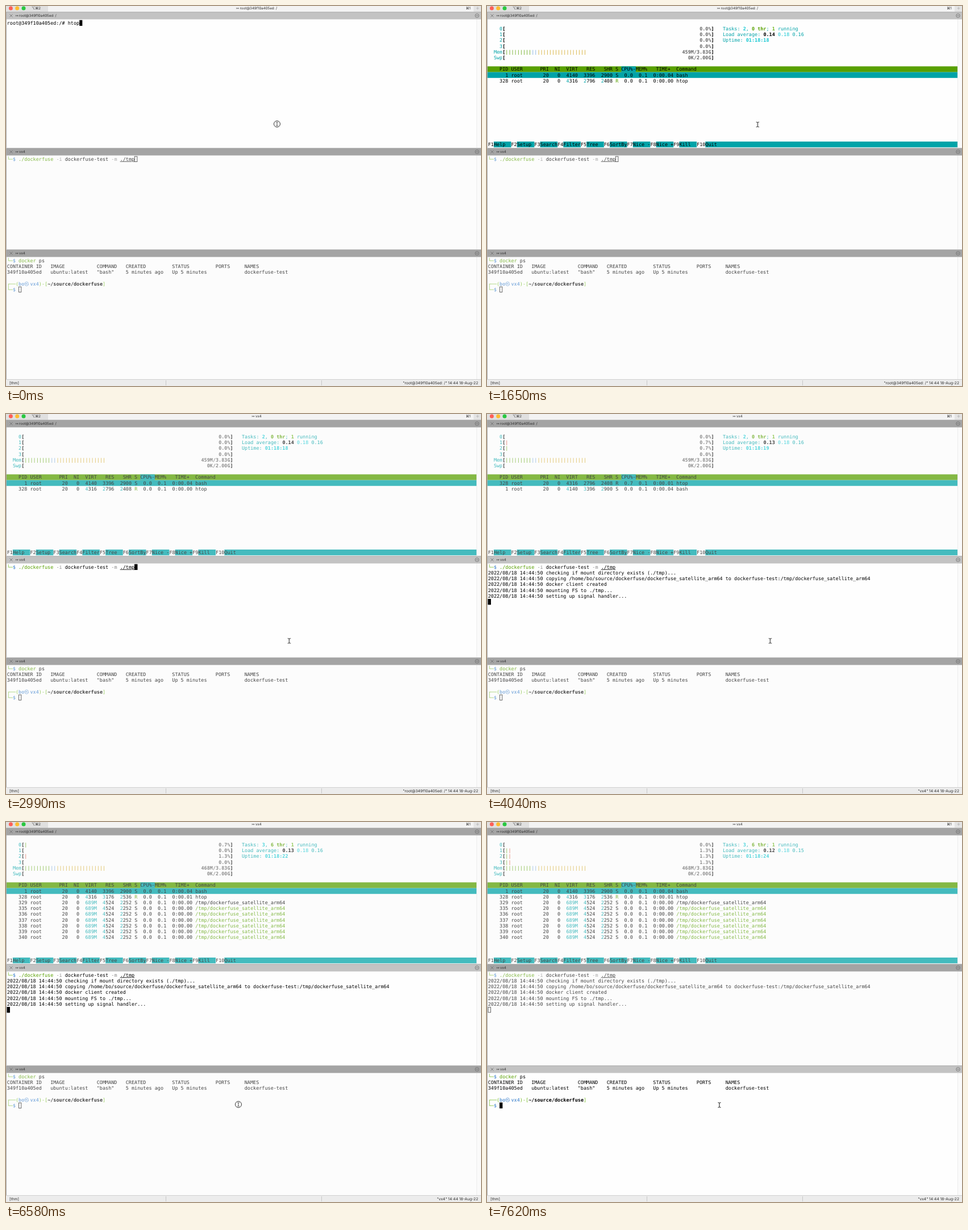
An HTML page that plays this animation: 836x670 px, repeating every 8 s.

```html
<!DOCTYPE html>
<html lang="en">
<head>
<meta charset="utf-8">
<title>Terminal session</title>
<style>
html, body { margin: 0; width: 100%; height: 100%; overflow: hidden; background: #fefefe; }
svg { display: block; width: 836px; height: 670px; }
text { white-space: pre; text-rendering: geometricPrecision; }
.term text { font: 8.475px "DejaVu Sans Mono", monospace; fill: #000; }
.ui { font: 6.15px Inter, "DejaVu Sans", sans-serif; fill: #2c2c2c; }
.term .t { fill: #00a3a8; }
.term .c { fill: #14c8d2; }
.term .g { fill: #58a000; }
.term .p { fill: #6fb81f; }
.term .b { fill: #6a9fd8; }
.term .r { fill: #d8432c; }
.term .y { fill: #cfa012; }
.term .a { fill: #8a8a8a; }
.term .s { fill: #666; }
.term .B { font-weight: bold; }
.term .u { text-decoration: underline; }
.term .k { font-family: "Noto Sans CJK KR", "Noto Sans CJK JP", "Noto Sans CJK", sans-serif; font-size: 8px; }
.teal { fill: #00a3a8; }
.green { fill: #58a000; }
.icon { fill: none; stroke: #6e6e6e; stroke-width: .8; }
</style>
</head>
<body>
<svg id="stage" viewBox="0 0 836 670"></svg>
<script>
const LOOP = 8000, CW = 5.102, CH = 10.2, LEFT = 1.7;
const HOST = 'vx4', SHELL = 'root@349f10a405ed: /';
let css = '', count = 0;

// Hard changes: a list of [time, declaration]
function steps(list) {
  const name = 'k' + count++;
  css += `@keyframes ${name}{${list.map(([t, d]) => `${t / LOOP * 100}%{${d}}`).join('')}}`;
  return `style="animation:${name} ${LOOP}ms step-end infinite"`;
}

function windowed(from, to, on, off) {
  const list = [[0, from > 0 ? off : on]];
  if (from > 0) list.push([from, on]);
  if (to < LOOP) list.push([to, off]);
  return steps(list);
}

const during = (from, to, body) =>
  `<g ${windowed(from, to, 'visibility:visible', 'visibility:hidden')}>${body}</g>`;

const rect = (x, y, w, h, attrs) =>
  `<rect x="${x}" y="${y}" width="${w}" height="${h}" ${attrs}/>`;

const label = (x, y, text, attrs = '') =>
  `<text class="ui" x="${x}" y="${y}" ${attrs}>${text}</text>`;

// Terminal grid: runs are "classes:text", joined by ¦
function grid(top) {
  const rowY = r => top + r * CH, colX = c => LEFT + c * CW;
  const line = (r, spec, col = 0) => spec.split('¦').map(run => {
    const i = run.indexOf(':'), text = run.slice(i + 1);
    const out = `<text class="${run.slice(0, i)}" x="${colX(col).toFixed(2)}" y="${(rowY(r) + 8.04).toFixed(2)}">${text}</text>`;
    col += text.length;
    return out;
  }).join('');
  const cells = (r, col, n, cls) =>
    rect(colX(col).toFixed(2), rowY(r).toFixed(2), (n * CW).toFixed(2), CH, `class="${cls}"`);
  const band = (r, cls, col = 0) => {
    const x = col ? colX(col) : 1;
    return rect(x, rowY(r), 828 - x, CH, `class="${cls}"`);
  };
  const cursor = (r, col, from, to) => {
    const x = colX(col), y = rowY(r);
    return rect(x + .4, y + .4, CW - .8, CH - .8, 'fill="none" stroke="#000" stroke-width=".8"') +
      during(from, to, rect(x, y, CW, CH, 'fill="#000"'));
  };
  return { line, cells, band, cursor };
}

// Panes
function pane(y, h, title, from, to, body) {
  const mid = y + 6;
  return rect(0, y + 12, 836, h - 12, windowed(from, to, 'fill:#fefefe', 'fill:#fcfcfc')) +
    rect(828, y + 12, 8, h - 12, 'fill="#fafafa"') +
    rect(828, y + 12, .7, h - 12, 'fill="#e6e6e6"') +
    rect(0, y, 836, 12.5, windowed(from, to, 'fill:#c3c3c3', 'fill:#a4a4a4')) +
    rect(0, y - .6, 836, .8, 'fill="#999"') +
    rect(0, y, 1, h, 'fill="#aaa"') +
    `<path class="icon" d="M6.5 ${mid - 2.5}l5 5m0-5l-5 5"/>` +
    `<circle class="icon" cx="829" cy="${mid}" r="3.3"/><path class="icon" d="M827 ${mid}h4"/>` +
    label(16.5, mid + 2.2, '↣') + label(23, mid + 2.2, title) +
    `<g class="term" ${windowed(from, to, 'opacity:1', 'opacity:.73')}>${body}</g>`;
}

// Process monitor
const top1 = grid(24.8);
const bash = { pid: '1', mem: ['4140', '3396', '2900'], state: 'S', cpu: '0.0', time: '0:00.04', cmd: 'bash' };
const monitor = (res, shr, cpu, time) =>
  ({ pid: '328', mem: ['4316', res, shr], state: 'R', cpu, time, cmd: 'htop' });
const satellites = [329, 335, 336, 337, 338, 339, 340].map((pid, i) => ({
  pid: '' + pid, mem: ['689M', '4524', '2252'], state: 'S', cpu: '0.0', time: '0:00.00',
  cmd: '/tmp/dockerfuse_satellite_arm64', thread: i > 0
}));

function processRow(p, i) {
  const chosen = i === 0;
  const num = s => chosen ? ':' + s : s.endsWith('M') ? 't:' + s : `t:${s[0]}¦:${s.slice(1)}`;
  const runs = [
    `:${p.pid.padStart(7)} root       20   0  `,
    p.mem.map(num).join('¦:  ¦'),
    ': ', (p.state === 'R' && !chosen ? 'g:' : ':') + p.state,
    `:  ${p.cpu}  0.1  ${p.time} `,
    (p.thread ? 'g:' : ':') + p.cmd
  ];
  return (chosen ? top1.band(9, 'teal') : '') + top1.line(9 + i, runs.join('¦'));
}

function readings(s) {
  const cpu = s.cpu.map(([bars, pct], i) =>
    [...bars].map((c, n) => top1.line(1 + i, c + ':|', 6 + n)).join('') +
    top1.line(1 + i, `s B:${pct}%`, 73)).join('');
  return cpu + top1.line(5, `s B:${s.mem}/3.83G`, 67) +
    top1.line(1, `t:Tasks: ¦c B:${s.tasks}¦t:, ¦g B:${s.threads} thr¦t:; ¦p B:1¦t: running`, 81) +
    top1.line(2, `t:Load average: ¦B:${s.load[0]} ¦c:${s.load[1]} ¦t:${s.load[2]}`, 81) +
    top1.line(3, `t:Uptime: ¦c B:01:18:${s.sec}`, 81) +
    s.procs.map(processRow).join('');
}

const idle = ['', '0.0'];
const small = { mem: '459M', tasks: 2, threads: 0 };
const large = { mem: '468M', tasks: 3, threads: 6 };
const settled = [bash, monitor('3176', '2536', '0.0', '0:00.01'), ...satellites];
const updates = [
  { ...small, at: 1650, cpu: [idle, idle, idle, idle], load: ['0.14', '0.18', '0.16'], sec: 18,
    procs: [bash, monitor('2796', '2408', '0.0', '0:00.00')] },
  { ...small, at: 3140, cpu: [idle, ['r', '0.7'], ['g', '0.7'], idle], load: ['0.13', '0.18', '0.16'], sec: 19,
    procs: [monitor('2796', '2408', '0.7', '0:00.01'), bash] },
  { ...large, at: 4640, cpu: [['gr', '1.3'], ['r', '0.7'], idle, ['g', '0.7']], load: ['0.13', '0.18', '0.16'], sec: 21,
    procs: [bash, monitor('2796', '2408', '0.0', '0:00.01'), ...satellites] },
  { ...large, at: 6130, cpu: [['g', '0.7'], idle, ['r', '1.3'], idle], load: ['0.13', '0.18', '0.16'], sec: 22,
    procs: settled },
  { ...large, at: 7620, cpu: [idle, ['gr', '1.3'], ['gr', '1.3'], ['gr', '1.3']], load: ['0.12', '0.18', '0.15'], sec: 24,
    procs: settled }
];

const keys = ['Help', 'Setup', 'Search', 'Filter', 'Tree', 'SortBy', 'Nice -', 'Nice +', 'Kill', 'Quit'];
const keyBar = keys.map((k, i) => {
  const col = i * 8, key = 'F' + (i + 1), start = col + key.length;
  return (i < 9 ? top1.cells(21, start, 6, 'teal') : top1.band(21, 'teal', start)) +
    top1.line(21, `:${key}¦:${k}`, col);
}).join('');

const frame = ['0', '1', '2', '3', 'Mem', 'Swp'].map((name, i) =>
  top1.line(1 + i, `t:${name.padStart(5)}¦B:[`) + top1.line(1 + i, 'B:]', 77)).join('') +
  top1.line(5, `g:${'|'.repeat(9)}¦b:||¦y:${'|'.repeat(17)}`, 6) +
  top1.line(6, 's B:0K/2.00G', 69) +
  top1.band(8, 'green') + top1.cells(8, 46, 5, 'teal') +
  top1.line(8, ':    PID USER      PRI  NI  VIRT   RES   SHR S CPU%-MEM%   TIME+  Command') + keyBar;

const shellPane =
  during(0, 1500, top1.line(0, ':root@349f10a405ed:/# htop') + top1.cells(0, 25, 1, 'block')) +
  during(1650, LOOP, frame) +
  updates.map((s, i) => during(s.at, i + 1 < updates.length ? updates[i + 1].at : LOOP, readings(s))).join('');

// Mount command
const top2 = grid(264.8);
const log = [
  'checking if mount directory exists (./tmp)...',
  'copying /home/bo/source/dockerfuse/dockerfuse_satellite_arm64 to dockerfuse-test:/tmp/dockerfuse_satellite_arm64',
  'docker client created',
  'mounting FS to ./tmp...',
  'setting up signal handler...'
];
// The solid block is nested, so its own window must end with the outer one
const mountPane =
  top2.line(0, 'p:└─¦b B:$¦: ¦g:./dockerfuse¦a: -i¦: dockerfuse-test¦a: -m¦: ¦u:./tmp') +
  during(0, 3890, top2.cursor(0, 44, 2990, 3890)) +
  during(3890, 4040, top2.cursor(1, 0, 3890, 4040)) +
  during(4040, LOOP, log.map((m, i) => top2.line(1 + i, ':2022/08/18 14:44:50 ' + m)).join('') +
    top2.cursor(6, 0, 4040, 6730));

// Container list
const top3 = grid(443.7);
const listPane =
  top3.line(0, 'p:└─¦b B:$¦: ¦g:docker¦: ps') +
  top3.line(1, ':CONTAINER ID   IMAGE           COMMAND   CREATED         STATUS         PORTS     NAMES') +
  top3.line(2, ':349f10a405ed   ubuntu:latest   "bash"    5 minutes ago   Up 5 minutes             dockerfuse-test') +
  top3.line(4, `p:┌──(¦b B:bo¦b k:㉿ ¦b B:${HOST}¦p:)-[¦B:~/source/dockerfuse¦p:]`) +
  top3.line(5, 'p:└─¦b B:$') +
  top3.cursor(5, 4, 6730, LOOP);

// Window chrome
const middle = 'text-anchor="middle"', end = 'text-anchor="end" style="font-size:6.7px"';
const tabs = rect(0, 0, 836, 11, 'fill="#f3f3f3"') + rect(0, 0, 74, 10.5, 'fill="#e0e0e0"') +
  rect(823, 0, 13, 10.5, 'fill="#e4e4e4"') +
  ['#fe5f57', '#febc2e', '#28c840'].map((c, i) =>
    `<circle cx="${8.4 + i * 11.3}" cy="4" r="3.5" fill="${c}"/>`).join('') +
  label(53, 6.3, '⌥⌘2', middle) + label(813.5, 6.3, '⌘1', middle) +
  '<path d="M827.5 4h5m-2.5-2.5v5" fill="none" stroke="#aaa" stroke-width=".7"/>' +
  during(0, 2990, label(441, 6.3, '↣ ' + SHELL, middle)) +
  during(2990, LOOP, label(441, 6.3, '↣ ' + HOST, middle));

const status = rect(0, 658, 836, 12, 'fill="#ececec"') + rect(0, 658, 836, .7, 'fill="#c4c4c4"') +
  rect(281, 660, .8, 9, 'fill="#c0c0c0"') + rect(555, 660, .8, 9, 'fill="#c0c0c0"') +
  label(6, 666.8, '[thm]', 'style="font-size:6.7px"') +
  during(0, 3890, label(831, 666.8, `"${SHELL}" 14:44 18-Aug-22`, end)) +
  during(3890, LOOP, label(831, 666.8, `"${HOST}" 14:44 18-Aug-22`, end));

// Pointer
const beam = '<path d="M-2.5-4.3q2 0 2.5 1q.5-1 2.5-1M0-3.4v6.8M-2.5 4.3q2 0 2.5-1q.5 1 2.5 1" fill="none" stroke="#111" stroke-width="1"/>';
const ring = `<circle r="5.5" fill="#fefefe" stroke="#222" stroke-width=".9"/><g transform="scale(.75)">${beam}</g>`;
const path = [
  [0, 477, 208], [150, 476.3, 209], [2400, 477, 209], [2540, 501, 352.5], [2690, 499.2, 400],
  [2840, 499, 399], [2990, 498.4, 400], [5540, 498.6, 399.5], [5690, 496, 403],
  [5830, 468, 446], [5980, 409.7, 499.4], [6580, 409, 498], [6730, 409, 499]
];
const clicks = [[0, 150], [2840, 2990], [6580, 6730]];
const pointer = `<g ${steps(path.map(([t, x, y]) => [t, `transform:translate(${x}px,${y}px)`]))}>` +
  during(150, 2840, beam) + during(2990, 6580, beam) + during(6730, LOOP, beam) +
  clicks.map(([a, b]) => during(a, b, ring)).join('') + '</g>';

const scene = tabs +
  pane(11, 239, SHELL, 0, 2990, shellPane) +
  pane(251, 178, HOST, 2990, 6730, mountPane) +
  pane(430, 228, HOST, 6730, LOOP, listPane) +
  status + pointer;

const sheet = document.createElement('style');
sheet.textContent = css;
document.head.append(sheet);
document.getElementById('stage').innerHTML = scene;
</script>
</body>
</html>
```
